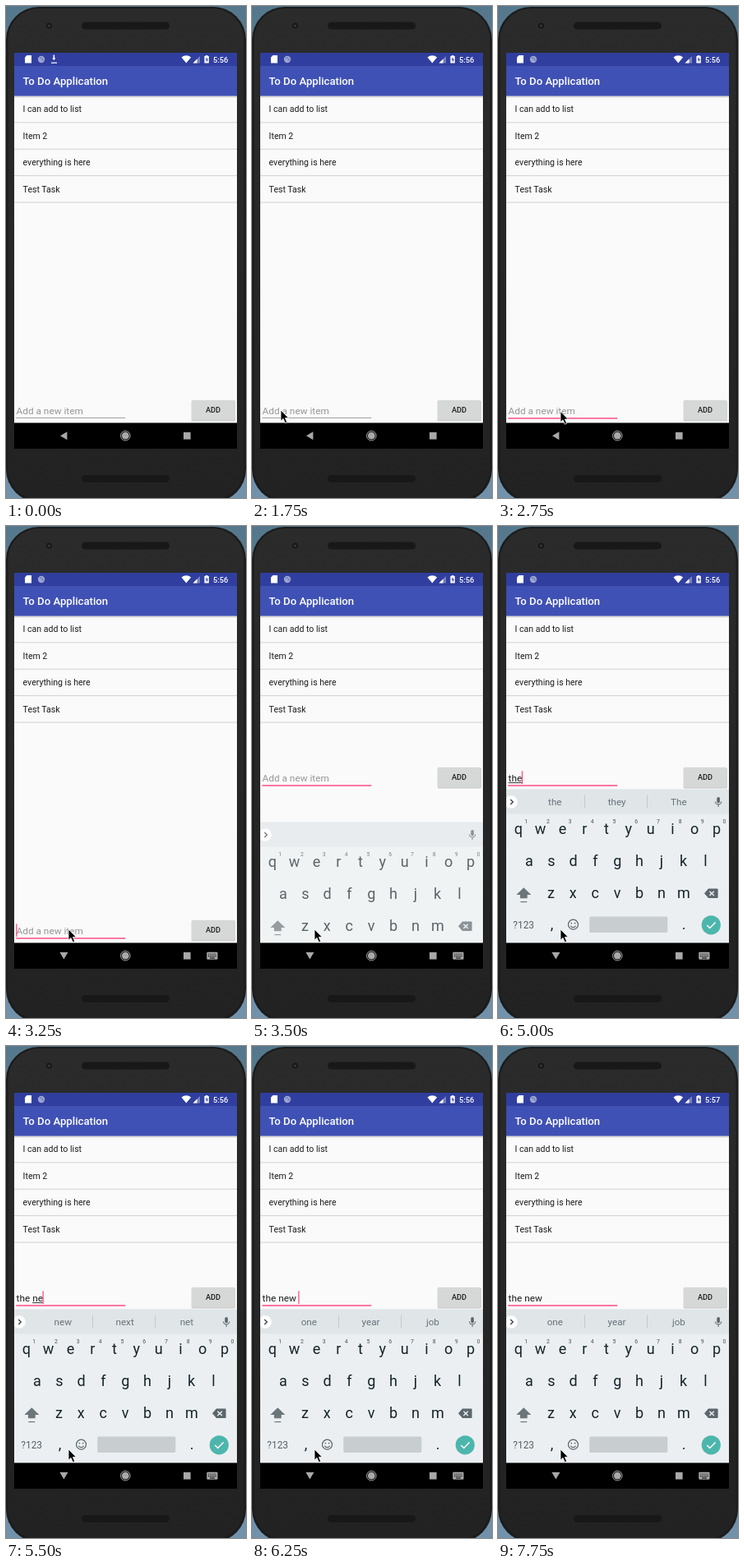
Write an HTML page that moves like this. It is 292 px wide and 599 px high and loops after 8000 ms.

```html
<!DOCTYPE html>
<html lang="en">
<head>
<meta charset="utf-8">
<title>To Do Application</title>
<style>
html, body { margin: 0; width: 100%; height: 100%; overflow: hidden; background: #67869a; }
svg { display: block; width: 292px; height: 599px; font-family: Roboto, sans-serif; }
text { white-space: pre; }
.mid { text-anchor: middle; }
.med { font-weight: 500; }
.row { font-size: 10.55px; fill: #1c1c1c; }
.field { font-size: 11.8px; }
.key { font-size: 18px; fill: #14242b; }
.num { font-size: 6.9px; fill: #46535a; }
.word { font-size: 11.7px; fill: #66737a; }
</style>
</head>
<body>
<svg viewBox="0 0 292 599" xmlns="http://www.w3.org/2000/svg">
  <defs>
    <linearGradient id="sky" x2="0" y2="1">
      <stop offset="0" stop-color="#55788c"/><stop offset="1" stop-color="#7292ab"/>
    </linearGradient>
    <linearGradient id="body" x2="0" y2="1">
      <stop offset="0" stop-color="#2b2b2b"/><stop offset="1" stop-color="#222"/>
    </linearGradient>
    <linearGradient id="shade" x2="0" y2="1">
      <stop offset="0" stop-color="#000" stop-opacity=".2"/><stop offset="1" stop-color="#000" stop-opacity="0"/>
    </linearGradient>
    <clipPath id="app"><rect x="10" y="57" width="271" height="450.5"/></clipPath>
  </defs>

  <!-- phone -->
  <rect width="292" height="599" fill="url(#sky)"/>
  <rect x="0" y="1" width="292" height="603" rx="40" fill="#1c1c1c"/>
  <rect x="2.5" y="3" width="287" height="598" rx="38" fill="url(#body)"/>
  <g fill="#181818">
    <rect x="92" y="19.5" width="107" height="9" rx="4.5"/>
    <rect x="92" y="571" width="107" height="9" rx="4.5"/>
    <circle cx="52.5" cy="24" r="3.6"/>
  </g>
  <circle cx="52.5" cy="24" r="1.6" fill="#33383c"/>

  <!-- screen -->
  <rect x="10" y="57" width="271" height="482" fill="#fafafa"/>
  <rect x="10" y="57" width="271" height="16.5" fill="#303f9f"/>
  <rect x="10" y="73" width="271" height="36.5" fill="#3f51b5"/>
  <rect x="10" y="109.5" width="271" height="3" fill="url(#shade)"/>
  <text x="20.6" y="96" class="med" font-size="13.2" fill="#fff">To Do Application</text>

  <!-- status bar -->
  <g fill="#fff">
    <path d="M25.5 60H31v9.5h-8V62.5z"/>
    <circle cx="43" cy="65" r="4.2" fill="#9aa5cf"/>
    <path d="M41 63.4a3 3 0 0 1 4 3.4" fill="none" stroke="#5d6cb5"/>
    <g id="load">
      <path id="arrow" d="M57.5 59.5h1.6v4h1.4l-2.2 2.6-2.2-2.6h1.4z"/>
      <rect x="55" y="68.6" width="7" height="1.2"/>
    </g>
    <path d="M213.5 62.6a8.2 8.2 0 0 1 11.6 0L219.3 69.5z"/>
    <path d="M236 61v8.5h-8.5z" opacity=".35"/>
    <path d="M232.5 64.5v5h-5z"/>
    <path d="M242.8 60h2.6v1h1.4v8.6h-5.4V61h1.4z"/>
    <path d="M244.6 62l-2 3.6h1.4v2.8l2-3.6h-1.4z" fill="#303f9f"/>
  </g>
  <text id="clock" x="252" y="68.5" class="med" font-size="9.2" fill="#fff"></text>

  <g id="list"></g>

  <!-- input row -->
  <g id="entry">
    <text id="hint" x="12.6" y="496.9" class="field" fill="#969696">Add a new item</text>
    <text id="typed" x="12.6" y="496.9" class="field" fill="#1c1c1c"></text>
    <rect id="mark" y="498.2" height=".9" fill="#1c1c1c"/>
    <rect id="line" x="12.3" width="133"/>
    <rect id="caret" y="484.3" width="1.2" height="15.7" fill="#ff4081"/>
    <rect x="225.6" y="480.6" width="53.4" height="24.8" rx="1.6" fill="#000" opacity=".18"/>
    <rect x="226" y="479.8" width="52.4" height="24.2" rx="1.4" fill="#d6d7d7"/>
    <text x="252" y="495.3" class="mid med" font-size="9.2" fill="#1c1c1c">ADD</text>
  </g>

  <!-- keyboard -->
  <g clip-path="url(#app)">
    <g id="board">
      <rect x="10" y="320.5" width="271" height="190" fill="#eceff1"/>
      <rect x="10" y="320.5" width="271" height="30" fill="#e0e5e8"/>
      <circle cx="16" cy="336" r="7.8" fill="#fff"/>
      <path d="M15.2 333l3 3-3 3" fill="none" stroke="#37474f" stroke-width="1.4"/>
      <g id="words"></g>
      <g id="keys"></g>
      <g fill="#5b676d">
        <rect x="266.3" y="330" width="3.6" height="7.4" rx="1.8"/>
        <path d="M264.4 335.4a3.7 3.7 0 0 0 7.4 0M268.1 339v3" fill="none" stroke="#5b676d"/>
        <g fill="#6b767b">
          <path d="M31.3 440.3l9 8.7h-4.6v4.2h-8.8V449h-4.6z"/>
          <rect x="27.4" y="457" width="7.8" height="1.2"/>
        </g>
        <path d="M256 441.5h10.6a1 1 0 0 1 1 1v9.6a1 1 0 0 1-1 1H256l-5-5.8z"/>
        <path d="M257.4 444.7l5.4 5.4m0-5.4l-5.4 5.4" stroke="#eceff1" stroke-width="1.4"/>
        <circle cx="91.5" cy="485.2" r="6" fill="none" stroke="#5b676d" stroke-width="1.2"/>
        <circle cx="89.4" cy="483.6" r=".9"/><circle cx="93.6" cy="483.6" r=".9"/>
        <path d="M88.4 486.7a3.4 3.2 0 0 0 6.2 0" fill="none" stroke="#5b676d" stroke-width="1.1"/>
      </g>
      <text x="31.2" y="489.6" class="mid" font-size="11.9" fill="#546067">?123</text>
      <text x="65.5" y="490.5" class="key mid">,</text>
      <text x="226" y="490.5" class="key mid">.</text>
      <rect x="111.3" y="475.6" width="95" height="19.4" rx="1.5" fill="#c8cdd0"/>
      <circle cx="259.3" cy="485.8" r="11.6" fill="#4db6ac"/>
      <path d="M254.3 486l3.5 3.5 6.8-7" fill="none" stroke="#fff" stroke-width="1.5"/>
    </g>
  </g>

  <!-- navigation bar -->
  <rect x="10" y="507.5" width="271" height="31.5" fill="#000"/>
  <g fill="#a8a8a8">
    <path id="back"/>
    <circle cx="145.3" cy="523.2" r="5.8" fill="none" stroke="#a8a8a8"/>
    <circle cx="145.3" cy="523.2" r="4.4"/>
    <rect x="216" y="519" width="8.6" height="8.6"/>
    <g id="switch">
      <rect x="244.3" y="518.8" width="13.2" height="9" rx="1"/>
      <path d="M246 521.3h10M246 523.6h10" stroke="#000" stroke-width="1.1" stroke-dasharray="1.2 .9"/>
      <path d="M248 526h6" stroke="#000"/>
    </g>
  </g>

  <path id="mouse" d="M0 0v13.2l3-2.8 2.3 5.3 2.3-1-2.2-5.1h4z" fill="#000" stroke="#fff" stroke-width=".8"/>
</svg>
<script>
const LOOP = 8000, STEP = 250;
const $ = id => document.getElementById(id);
const set = (id, attrs) => { for (const k in attrs) $(id).setAttribute(k, attrs[k]); };
const show = (id, on) => set(id, { visibility: on ? 'visible' : 'hidden' });
const label = (cls, x, y, s) => `<text class="${cls}" x="${x}" y="${y}">${s}</text>`;

$('list').innerHTML = ['I can add to list', 'Item 2', 'everything is here', 'Test Task'].map((s, i) =>
  label('row', 20.6, 129.3 + 32.5 * i, s) +
  `<rect x="10" y="${141.4 + 32.4 * i}" width="271" height=".9" fill="#cdcdcd"/>`).join('');

const keyRow = (chars, x, y, pitch) =>
  [...chars].map((c, i) => label('key mid', x + pitch * i, y, c)).join('');
$('keys').innerHTML =
  keyRow('qwertyuiop', 24.8, 375, 26.8) +
  [...'1234567890'].map((c, i) => label('num mid', 34.2 + 26.8 * i, 361.6, c)).join('') +
  keyRow('asdfghjkl', 38, 414, 26.8) +
  keyRow('zxcvbnm', 64.4, 453, 26.9);

// [start, x, y]
const moves = [
  [250, 42.5, 500], [750, 57.5, 491], [1750, 35, 492], [2000, 62.5, 494.5],
  [2250, 76, 494.5], [2750, 76, 493.5], [3000, 76, 491]
];
// [start, text, start of the word being composed, suggestions]
const typing = [
  [0, '', 0, []],
  [4750, 't', 0, ['to', 'the', 'think']],
  [5000, 'the', 0, ['the', 'they', 'The']],
  [5250, 'the ', 4, ['first', 'same', 'one']],
  [5500, 'the ne', 4, ['new', 'next', 'net']],
  [5750, 'the new', 4, ['new', 'news', 'New']],
  [6250, 'the new ', 8, ['one', 'year', 'job']]
];
// [start, caret visible]
const blink = [[0, 0], [3000, 1], [3500, 0], [4000, 1], [4500, 0], [4750, 1], [6750, 0], [7250, 1], [7750, 0]];
const at = (list, t) => list.filter(e => e[0] <= t).pop();

function width(s) {
  $('typed').textContent = s;
  return s ? $('typed').getComputedTextLength() : 0;
}

function draw(t) {
  show('load', t < 500);
  set('arrow', { transform: `translate(0 ${t < 250 ? 0 : 2})` });
  $('clock').textContent = t < 7250 ? '5:56' : '5:57';

  const focus = t >= 2750, open = t >= 3500, sliding = open && t < 3750;
  set('entry', { transform: `translate(0 ${open ? -186 : 0})` });
  set('line', focus ? { y: 501.3, height: 1.4, fill: '#ff4081' } : { y: 501.2, height: .8, fill: '#8a8a8a' });

  const [, text, from, words] = at(typing, t);
  const left = width(text.slice(0, from)), end = width(text);
  show('hint', !text);
  set('mark', { x: 12.6 + left, width: Math.max(0, end - left) });
  set('caret', { x: 12.2 + end });
  show('caret', at(blink, t)[1]);

  show('board', open);
  set('board', { transform: `translate(0 ${sliding ? 40 : 0})`, opacity: sliding ? .7 : 1 });
  $('words').innerHTML = words.map((w, i) => label('word mid', 69.3 + 75.3 * i, 340.4, w)).join('') +
    (words.length ? '<path d="M105.5 328v15M181.5 328v15" stroke="#c3cacd"/>' : '');

  const down = t >= 3250;
  set('back', { d: down ? 'M65.4 519h10l-5 8.6z' : 'M66 523.2l8.4-5v10z' });
  show('switch', down);

  const spot = at(moves, t);
  show('mouse', spot);
  if (spot) set('mouse', { transform: `translate(${spot[1]} ${spot[2]})` });
}

let last = -1;
function tick() {
  const t = Math.floor(performance.now() % LOOP / STEP) * STEP;
  if (t !== last) draw(last = t);
  requestAnimationFrame(tick);
}
tick();
</script>
</body>
</html>
```
